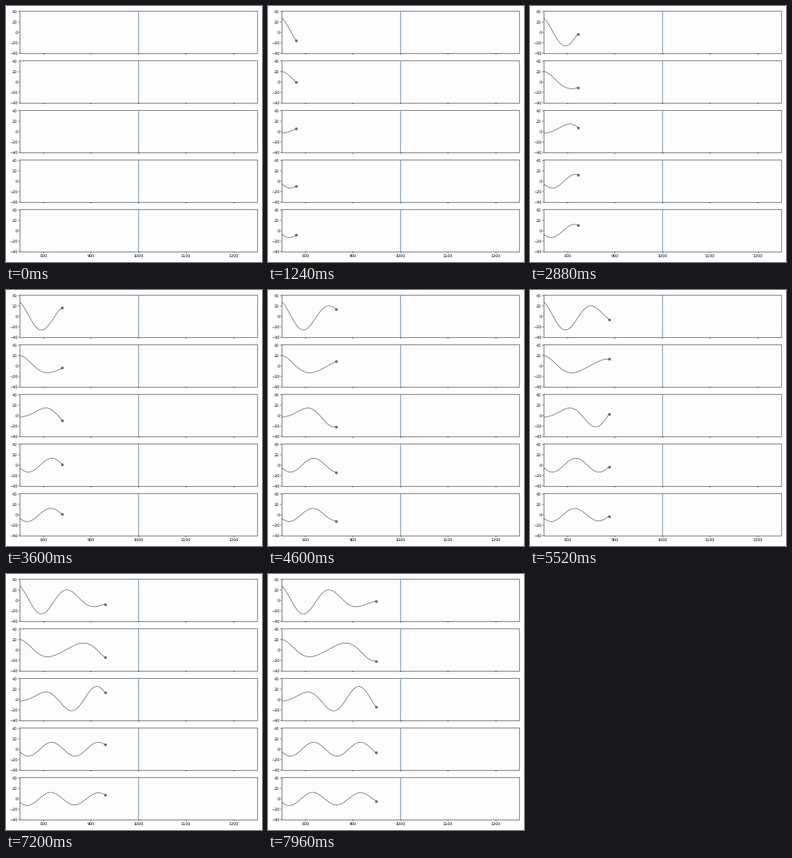
A matplotlib script for the animation above (8000 ms loop, 320 by 320 pixels).

```python
import numpy as np
import matplotlib.pyplot as plt
from matplotlib.animation import FuncAnimation

SIZE = 320
FRAMES, STEP_MS = 200, 40
X0, MID, SPAN = 750, 849, 99
HALF_PERIOD = 54

plt.rcParams.update({
    "font.family": "DejaVu Sans",
    "font.size": 3.5,
    "text.hinting": "none",
    "axes.linewidth": 0.34,
    "xtick.major.width": 0.34, "ytick.major.width": 0.34,
    "xtick.major.size": 1.12, "ytick.major.size": 1.12,
    "xtick.major.pad": 1.12, "ytick.major.pad": 1.12,
})

# Slowly changing amplitude and phase of each wave: square, linear, constant
ENVELOPES = [
    (-3.7 - 3.5j, -12.7 - 2.5j, 20 - 2.2j),
    (-1.8j, -15.9 - 3.1j, 1.4 - 11.3j),
    (3.5 - 6.5j, -8.2 + 7.5j, -18 + 9.8j),
    (1 - 1.95j, -6.5 - 3.35j, -6.1 + 11.7j),
    (1.85 - 0.15j, -4.15 - 3.35j, -6.4 + 10j),
]


def wave(envelope, x):
    """Carrier wave shaped by a complex quadratic envelope."""
    carrier = np.exp(1j * np.pi * (x - MID) / HALF_PERIOD)
    return (np.polyval(envelope, (x - MID) / SPAN) * carrier).real


xs = np.arange(X0, X0 + FRAMES - 1)
waves = [wave(envelope, xs) for envelope in ENVELOPES]

fig = plt.figure(figsize=(SIZE / 100, SIZE / 100), dpi=100, facecolor="white")
trails, dots = [], []
for row in range(5):
    bottom = 59.3 + 62 * row
    ax = fig.add_axes([17.4 / SIZE, 1 - bottom / SIZE,
                       296.8 / SIZE, 52.7 / SIZE], facecolor="#fdfdfd")
    ax.set(xlim=(750, 1250), ylim=(-40, 40),
           xticks=range(800, 1201, 100), yticks=range(-40, 41, 20))
    ax.tick_params(labelbottom=row == 4)
    for spine in ax.spines.values():
        spine.set_snap(False)
    ax.axvline(1000, color="tab:blue", lw=0.52, snap=False)
    trails.append(ax.plot([], [], color="#444444", lw=0.42)[0])
    dots.append(ax.plot([], [], "o", ms=1.95, mfc="#808080",
                        mec="#303030", mew=0.35, snap=False)[0])


def draw(i):
    for ys, trail, dot in zip(waves, trails, dots):
        head = slice(max(i - 1, 0), i)
        trail.set_data(xs[:i], ys[:i])
        dot.set_data(xs[head], ys[head])
    return trails + dots


anim = FuncAnimation(fig, draw, frames=FRAMES, init_func=lambda: draw(0),
                     interval=STEP_MS, repeat=True, repeat_delay=0)
plt.show()
```
